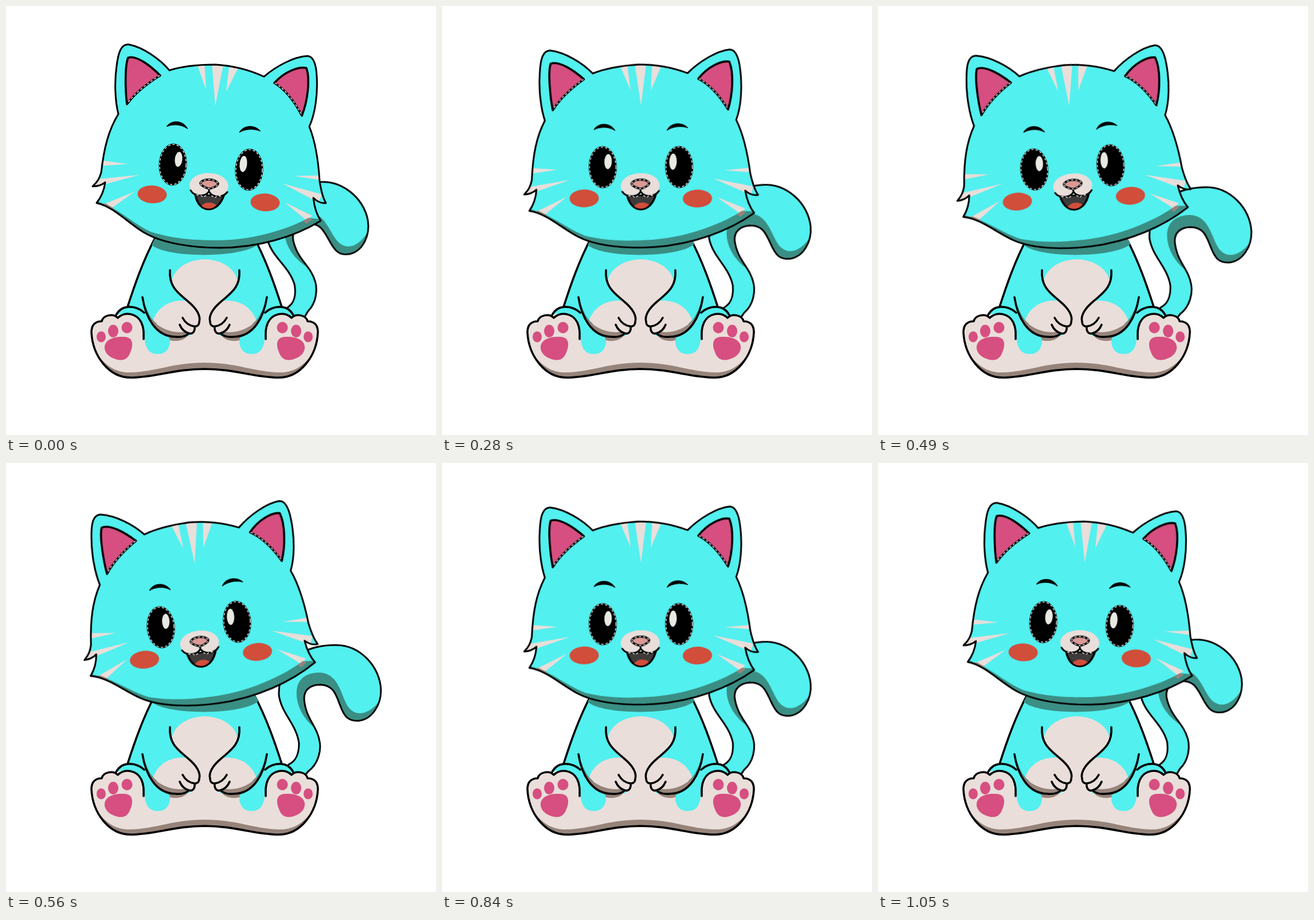
These frames come from a looping animation (750x747 px, 1120 ms). An HTML page:

```html
<!DOCTYPE html>
<html lang="en">
<head>
<meta charset="utf-8">
<title>Kitten</title>
<style>
  html, body { margin: 0; width: 100%; height: 100%; overflow: hidden; background: #fff; }
  svg { display: block; width: 100vw; height: 100vh; }
  .sway { animation: 1120ms steps(8, end) infinite; }
  #head { transform-origin: 352px 431px; animation-name: nod; }
  #tail { transform-origin: 492px 538px; animation-name: wag; }
  @keyframes nod { 50% { transform: rotate(-8deg); } }
  @keyframes wag { 0%, 100% { transform: rotate(-8.5deg); } 50% { transform: rotate(0deg); } }
  .blue { fill: #52f0ef; }
  .cream { fill: #e9deda; }
  .pink { fill: #d64f80; }
  .teal { fill: #3b8e84; }
  .brown { fill: #96847b; }
  .red { fill: #d14e3b; }
  .line { stroke: #000; stroke-width: 3.6; stroke-linejoin: round; stroke-linecap: round; }
  .fine { stroke-width: 3; }
  .open { fill: none; }
  .glint { fill: none; stroke: #fff; stroke-width: 1.3; stroke-dasharray: 4 3.5; }
</style>
</head>
<body>
<svg viewBox="0 0 750 747" preserveAspectRatio="none">
  <defs>
    <path id="tailShape" d="M512 556 L527 537 C545 524 550 500 547 485 C543 458 522 445 520 410 C520 394 532 386 548 386 C571 387 575 402 582 420 C590 442 596 449 614 449 C638 447 654 422 654 396 C653 355 618 317 575 317 C550 317 532 321 515 331 C488 348 475 376 476 404 C480 436 507 455 511 488 C511 507 506 519 493 525 L484 545"/>
    <path id="headShape" d="M196 188 C190 165 189 130 193 104 C196 80 201 66 214 67 C240 72 269 93 285 112 C310 104 336 102 365 102 C400 104 426 112 450 123 C472 104 503 88 526 87 C537 88 541 102 542 122 C544 155 539 188 529 210 C540 237 545 272 547 305 C550 324 553 335 558 343 C550 344 543 341 536 334 C538 351 542 364 549 374 C503 402 440 421 372 421 C324 421 272 413 240 394 C212 377 187 349 158 343 C166 333 171 322 173 307 C167 312 160 314 151 314 C160 306 163 300 166 290 C171 246 179 216 196 188 Z"/>
    <path id="baseShape" d="M348 632 C290 632 262 647 217 647 C180 647 151 610 149 568 C149 556 155 549 167 549 C169 539 186 534 195 543 C207 531 232 537 240 562 L300 540 H348 Z"/>
    <path id="handShape" d="M238 506 C243 540 260 576 296 576 C306 577 314 575 319 570 C326 572 330 566 329 558 C334 558 337 555 337 550 C340 540 333 527 317 514 L250 500 Z"/>
    <clipPath id="inTail"><use href="#tailShape"/></clipPath>
    <clipPath id="inHead"><use href="#headShape"/></clipPath>
    <clipPath id="inBase"><use href="#baseShape"/></clipPath>
    <clipPath id="inHand"><use href="#handShape"/></clipPath>

    <g id="half">
      <use href="#baseShape" class="cream"/>
      <path class="brown" clip-path="url(#inBase)" d="M145 580 C161 617 184 639 217 638 C262 637 290 621 348 621 V660 H145 Z"/>
      <path class="blue" d="M348 400 H261 C238 445 223 490 212 523 Q198 525 192 539 C210 531 235 534 241 570 C242 593 247 606 265 606 C281 606 286 595 288 575 H348 Z"/>
      <path class="cream" d="M348 441 C312 441 287 463 289 486 C297 501 320 512 331 530 C342 545 335 560 318 576 H286 V600 H348 Z"/>
      <path class="brown" d="M282 570 H318 C317 580 300 586 286 582 Z"/>
      <use href="#handShape" class="blue"/>
      <g clip-path="url(#inHand)">
        <path class="cream" d="M256 549 C266 519 294 510 318 514 L345 540 V590 H260 Z"/>
        <path class="teal" d="M238 506 C247 535 253 545 263 553 L258 570 Z"/>
        <path class="brown" d="M250 541 C266 562 291 571 314 567 V582 H260 Z"/>
      </g>
      <g class="line open">
        <path d="M261 402 C238 445 223 490 212 524"/>
        <path d="M192 538 Q199 525 213 524 Q229 523 241 534"/>
        <path d="M348 632 C290 632 262 647 217 647 C180 647 151 610 149 568 C149 556 155 549 167 549 C169 539 186 534 195 543 C207 531 228 535 236 551 C241 562 240 570 240 580"/>
        <path d="M286 460 C284 490 301 500 317 514 C333 527 340 540 337 550 C337 555 334 558 329 558 C330 566 326 572 319 570 C314 575 306 577 296 576 C260 576 243 540 238 507"/>
        <path d="M308 543 Q315 556 329 558 M303 555 Q308 567 319 570"/>
      </g>
      <g class="pink">
        <path d="M172 596 C171 580 190 575 205 576 C224 576 222 593 216 605 C210 620 196 618 184 612 C177 608 173 603 172 596 Z"/>
        <ellipse cx="166" cy="576" rx="8" ry="9.5"/>
        <ellipse cx="187" cy="566" rx="9" ry="11"/>
        <ellipse cx="211" cy="560" rx="9.5" ry="10"/>
      </g>
    </g>

    <g id="eye">
      <ellipse rx="24.5" ry="36.5"/>
      <ellipse class="glint" rx="23" ry="35"/>
    </g>
    <path id="nose" d="M339 308 C344 300 364 300 370 309 C370 313 360 318 354 318 C348 317 339 312 339 308 Z"/>
  </defs>

  <g id="tail" class="sway">
    <use href="#tailShape" class="blue"/>
    <path class="teal" clip-path="url(#inTail)" d="M537 460 C518 444 505 420 507 396 C509 373 528 364 549 365 C578 368 583 397 593 418 C606 446 637 441 660 402 V465 H570 L560 400 L530 398 Z"/>
    <use href="#tailShape" class="line fine open"/>
  </g>

  <use href="#half"/>
  <use href="#half" transform="translate(693 0) scale(-1 1)"/>
  <path class="teal" d="M260 404 H434 L441 414 C415 439 281 440 254 416 Z"/>

  <g id="head" class="sway">
    <use href="#headShape" class="blue"/>
    <g clip-path="url(#inHead)">
      <g class="cream">
        <path d="M332 98 L346 98 L349 146 Z M359 98 L380 98 L365 174 Z M390 98 L407 104 L384 149 Z"/>
        <path d="M160 268 L212 275 L160 279 Z M155 302 L233 294 L155 315 Z M166 347 L225 323 L184 352 Z"/>
        <path d="M555 295 L502 296 L555 304 Z M482 309 L551 328 L545 342 Z M486 342 L534 365 L524 373 Z"/>
      </g>
      <path class="teal" d="M150 337 C197 351 215 375 252 393 C290 405 325 408 372 408 C437 407 497 386 528 369 L555 372 V430 H150 Z"/>
      <path class="brown" d="M166 345 L174 344 L188 352 L184 358 Z M518 374 L528 369 L535 371 L524 379 Z"/>
    </g>
    <use href="#headShape" class="line fine open"/>

    <g class="pink line">
      <path d="M213 90 C228 85 253 105 269 121 C246 135 225 152 211 171 C208 147 207 104 213 90 Z"/>
      <path d="M468 134 C486 114 510 105 524 108 C531 128 526 166 516 191 C504 168 488 146 468 134 Z"/>
    </g>
    <path class="glint" d="M268 121 C246 135 225 152 211 170 M469 134 C488 146 504 168 516 190"/>

    <path d="M280 210 C288 198 309 198 317 214 C306 206 292 205 280 210 Z M407 220 C414 207 434 206 444 218 C431 213 418 214 407 220 Z" stroke="#000" stroke-linejoin="round"/>

    <use href="#eye" transform="translate(291 276) rotate(3)"/>
    <use href="#eye" transform="translate(424 285) rotate(3)"/>
    <g fill="#e9e9e4">
      <ellipse cx="301" cy="267" rx="6.5" ry="13" transform="rotate(6 301 267)"/>
      <ellipse cx="414" cy="275" rx="6.5" ry="14" transform="rotate(6 414 275)"/>
    </g>

    <g class="red">
      <ellipse cx="255" cy="328" rx="25.5" ry="15.5" transform="rotate(3 255 328)"/>
      <ellipse cx="452" cy="342" rx="25.5" ry="15.5" transform="rotate(3 452 342)"/>
    </g>

    <path class="line" fill="#3e3b3b" d="M330 328 C333 345 342 354 354 354 C367 353 375 344 380 330 Z"/>
    <path class="red" d="M341 348 C347 340 361 341 367 347 C359 355 348 354 341 348 Z"/>
    <path class="cream" d="M320 312 C321 299 335 291 354 291 C374 291 388 302 388 314 C387 331 363 337 354 325 C343 335 321 330 320 312 Z"/>
    <path class="line fine open" d="M322 321 C329 333 348 332 354 323 C361 335 378 334 386 324 M354 317 V324"/>
    <path class="glint" d="M332 329 L340 330 L344 333 L354 327 L364 334 L368 331 L377 331"/>
    <use href="#nose" class="line" fill="#db9996"/>
    <use href="#nose" class="glint"/>
  </g>
</svg>
</body>
</html>
```
